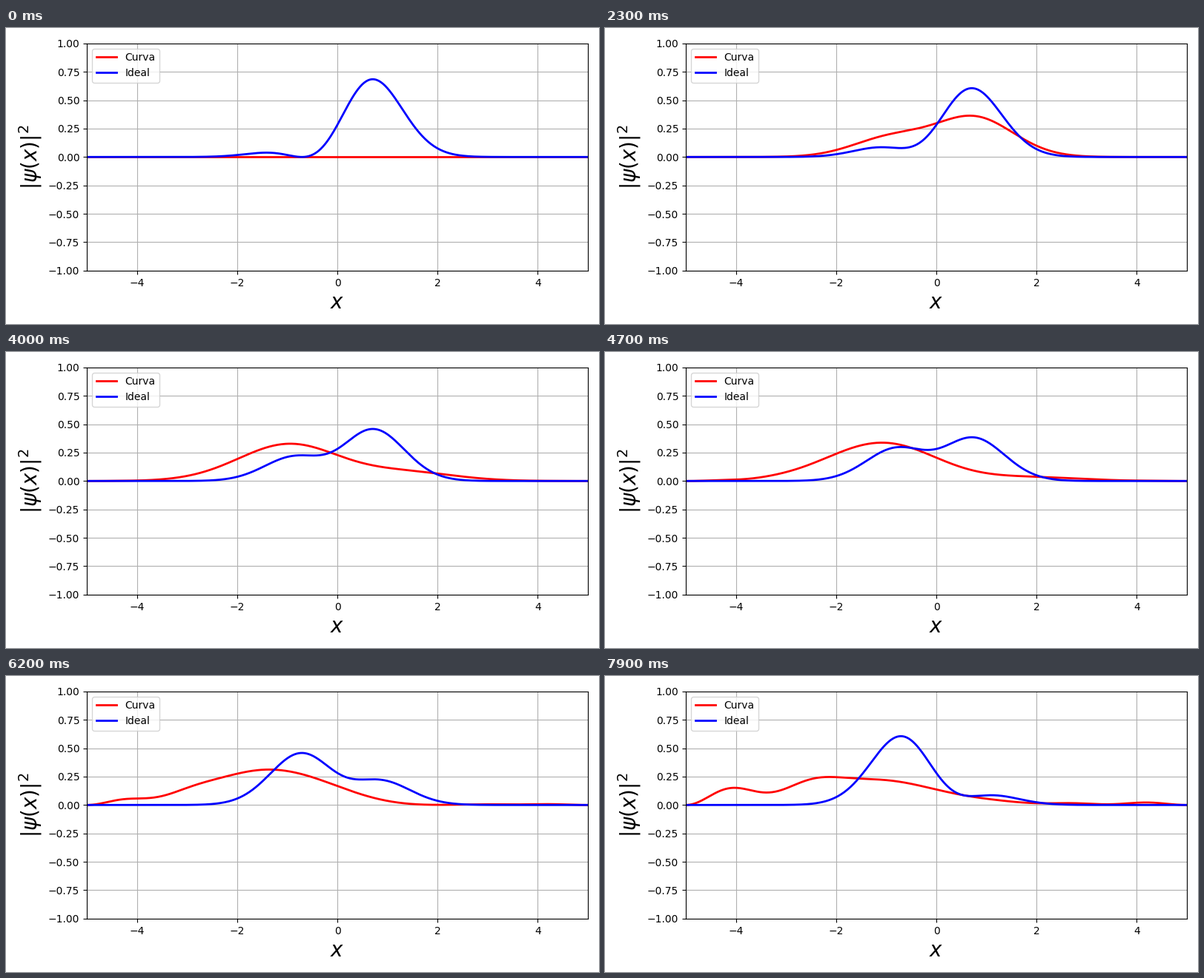
Animation, 800 px wide and 400 px high, one loop 8000 ms. Source, as a matplotlib script:

```python
import numpy as np
import matplotlib.pyplot as plt
from matplotlib.animation import FuncAnimation

FRAMES = 80
DT = np.pi / 100
WALL = 5
x = np.linspace(-WALL, WALL, 500)


def trapped(t):
    """Density of the two lowest oscillator states in equal parts."""
    mix = 1 + 2 * x**2 + 2 * np.sqrt(2) * x * np.cos(t)
    return np.exp(-x**2) / np.sqrt(np.pi) * mix / 2


def packet(x, t, a=0.8, b=0.6):
    """Spreading wave made of the same two states, weights a and b."""
    s = np.sqrt(1 + t * t)
    u = x / s
    phase = t + np.arctan(t)
    envelope = np.exp(-u**2 / 2 * (1 - 1j * t)) / np.sqrt(s * np.sqrt(np.pi))
    return envelope * (a + b * np.sqrt(2) * u * np.exp(-1j * phase))


def spreading(t):
    """Density between hard walls, by mirror images."""
    psi = packet(x, t) - packet(2 * WALL - x, t) - packet(-2 * WALL - x, t)
    return np.abs(psi)**2


fig, ax = plt.subplots(figsize=(8, 4), dpi=100)
fig.subplots_adjust(left=109 / 800, right=785 / 800,
                    bottom=1 - 327.8 / 400, top=1 - 20.8 / 400)
curve, = ax.plot(x, 0 * x, color="red", lw=2, label="Curva")
ideal, = ax.plot(x, trapped(0), color="blue", lw=2, label="Ideal")
ax.set_xlim(-WALL, WALL)
ax.set_ylim(-1, 1)
ax.set_xlabel(r"$x$", fontsize=20)
ax.set_ylabel(r"$|\psi(x)|^2$", fontsize=20)
ax.grid(True)
ax.legend(loc="upper left")


def update(n):
    # The red curve starts flat; time runs from the second frame on.
    t = max(n - 1, 0) * DT
    curve.set_ydata(spreading(t) if n else 0 * x)
    ideal.set_ydata(trapped(t))
    return curve, ideal


anim = FuncAnimation(fig, update, frames=FRAMES, interval=100,
                     repeat=True, repeat_delay=0, blit=False)
plt.show()
```
